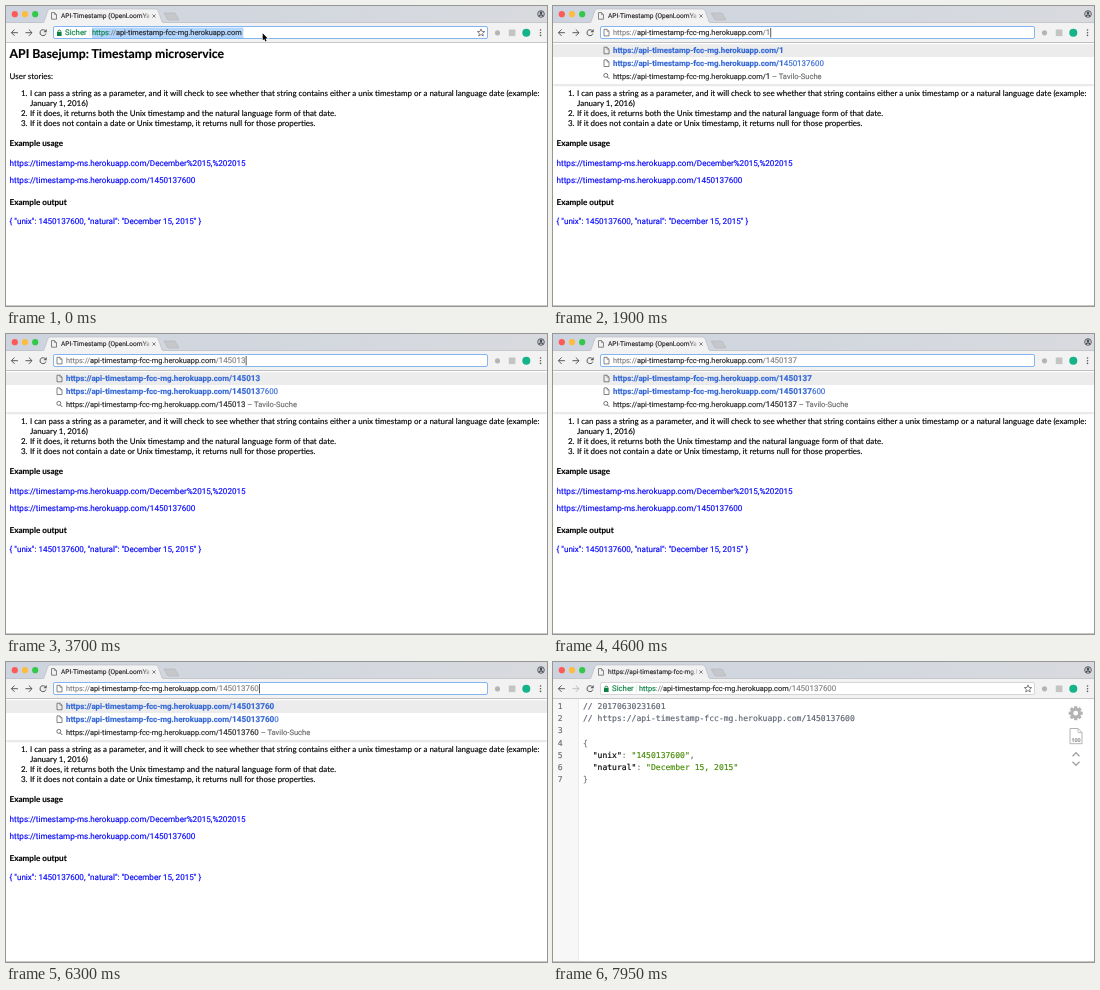
An HTML page with a canvas that plays this animation: 541 by 300 pixels, repeating every 8 s.

```html
<!DOCTYPE html>
<html lang="en">
<head>
<meta charset="utf-8">
<title>Timestamp microservice</title>
<style>
html, body { margin: 0; width: 100%; height: 100%; overflow: hidden; background: #fff; }
canvas { display: block; width: 541px; height: 300px; }
</style>
</head>
<body>
<canvas id="stage"></canvas>
<script>
const W = 541, H = 300, LOOP = 8000;
const canvas = document.getElementById('stage');
const ctx = canvas.getContext('2d');
const ratio = window.devicePixelRatio || 1;
canvas.width = W * ratio;
canvas.height = H * ratio;
ctx.textRendering = 'geometricPrecision';

const HOST = 'api-timestamp-fcc-mg.herokuapp.com';
const DIGITS = '1450137600';
const DESELECT = 500, FIRST_KEY = 900, ENTER = 6850, LOADED = 7450;
const KEYS = [1800, 2050, 2400, 3000, 3300, 3600, 3950, 6050, 6250, 6500];

const ui = size => `${size}px Roboto, sans-serif`;
const lato = size => `${size}px Lato, sans-serif`;
const UI = ui(7.4), UI_NUM = ui(7.95);
const UI_BOLD = 'bold ' + ui(7.88), UI_BOLD_NUM = 'bold ' + ui(8.2);
const BODY = lato(7.97), BODY_BOLD = 'bold ' + lato(8.1);
const LINK = ui(8.1), MONO = '8.07px "DejaVu Sans Mono", monospace';
const GREY = '#808080', DARK = '#5a5a5a', INK = '#222', BLUE = '#3367d6', GREEN = '#0b8043';

// A hairline stroke gives the slightly heavy look of smoothed screen text.
function text(str, x, y, font, color) {
  ctx.font = font;
  ctx.fillStyle = ctx.strokeStyle = color;
  ctx.lineWidth = 0.15;
  ctx.fillText(str, x, y);
  ctx.strokeText(str, x, y);
  return x + ctx.measureText(str).width;
}

// Draws [text, font, color] pieces one after another, returns the end x.
function run(x, y, pieces) {
  for (const [str, font, color] of pieces) x = text(str, x, y, font, color);
  return x;
}

function box(x, y, w, h, color) {
  ctx.fillStyle = color;
  ctx.fillRect(x, y, w, h);
}

function trace(points, close) {
  ctx.beginPath();
  points.forEach(([x, y], i) => i ? ctx.lineTo(x, y) : ctx.moveTo(x, y));
  if (close) ctx.closePath();
}

function line(points, color, width = 1, close = false) {
  trace(points, close);
  ctx.strokeStyle = color;
  ctx.lineWidth = width;
  ctx.stroke();
}

function shape(points, color) {
  trace(points, true);
  ctx.fillStyle = color;
  ctx.fill();
}

function disc(x, y, r, color) {
  ctx.beginPath();
  ctx.arc(x, y, r, 0, 7);
  ctx.fillStyle = color;
  ctx.fill();
}

function arc(x, y, r, from, to, color, width = 1) {
  ctx.beginPath();
  ctx.arc(x, y, r, from, to);
  ctx.strokeStyle = color;
  ctx.lineWidth = width;
  ctx.stroke();
}

function pageIcon(x, y, color = '#666') {
  line([[x, y], [x + 3, y], [x + 5, y + 2], [x + 5, y + 6.6], [x, y + 6.6]], color, 0.8, true);
  line([[x + 3, y], [x + 3, y + 2], [x + 5, y + 2]], color, 0.6);
}

function cross(x, y, r, color, width) {
  line([[x - r, y - r], [x + r, y + r]], color, width);
  line([[x + r, y - r], [x - r, y + r]], color, width);
}

function arrow(x, y, dir, color) {
  line([[x - 3.3 * dir, y], [x + 3.2 * dir, y]], color, 1);
  line([[x, y - 3.2], [x + 3.2 * dir, y], [x, y + 3.2]], color, 1);
}

function star(x, y) {
  const points = [];
  for (let i = 0; i < 10; i++) {
    const a = i * Math.PI / 5 - Math.PI / 2, r = i % 2 ? 1.7 : 3.9;
    points.push([x + r * Math.cos(a), y + r * Math.sin(a)]);
  }
  line(points, '#666', 0.8, true);
}

function tabStrip(s) {
  const g = ctx.createLinearGradient(0, 0, W, 0);
  g.addColorStop(0, '#cdd4df');
  g.addColorStop(1, '#d8dade');
  box(0, 0, W, 17, g);
  ['#fc5b57', '#fdbc40', '#34c84a'].forEach((c, i) => disc(8.8 + 10.2 * i, 8.2, 3.1, c));
  box(0, 16.5, W, 0.5, '#b4b4b4');
  const tab = [[36, 17], [38, 16], [42, 4.4], [44, 3], [150, 3], [152, 4.4], [156, 16], [158, 17]];
  shape(tab, '#f2f2f2');
  line(tab, '#b0b0b0', 0.5);
  const plus = [[158, 7], [169, 7], [173, 14], [162, 14]];
  shape(plus, '#c5c7ca');
  line(plus, '#aeaeae', 0.5, true);

  if (s.loading) {
    const a = -Math.PI / 2 - (s.t - ENTER - 100) / 1000 * Math.PI * 2;
    arc(48, 10, 3.2, a, a + 1.7, '#888', 0.9);
  } else pageIcon(45.5, 6.6);

  ctx.save();
  ctx.beginPath();
  ctx.rect(54, 3, 90, 14);
  ctx.clip();
  const fade = ctx.createLinearGradient(135, 0, 144, 0);
  fade.addColorStop(0, '#222');
  fade.addColorStop(1, 'rgba(34,34,34,0.15)');
  text(s.loaded ? 'https://' + HOST : 'API-Timestamp (OpenLoomYard)', 55, 12.3, ui(6.6), fade);
  ctx.restore();
  cross(148, 10, 1.6, '#666', 0.8);

  arc(535, 8, 3.3, 0, 7, '#4a4f57', 0.9);
  disc(535, 7, 1.4, '#4a4f57');
  arc(535, 10.6, 1.8, Math.PI, 0, '#4a4f57', 1.2);
}

function toolbar(s) {
  box(0, 17, W, 19.5, '#f2f2f2');
  box(0, 36, W, 0.8, '#bcbcbc');
  arrow(8.6, 26.7, -1, DARK);
  arrow(22.8, 26.7, 1, s.loaded ? '#bdbdbd' : DARK);
  if (s.loading) cross(37, 26.7, 2.7, DARK, 1.1);
  else {
    arc(37, 26.7, 3, 0.3, 5.4, DARK, 1);
    shape([[40.7, 22.9], [40.7, 26.3], [37.3, 26.3]], DARK);
  }

  ctx.beginPath();
  ctx.roundRect(47.5, 20.5, 434, 12, 1.5);
  ctx.fillStyle = '#fff';
  ctx.fill();
  ctx.strokeStyle = s.focus ? '#83b5ef' : '#c8c8c8';
  ctx.lineWidth = s.focus ? 1 : 0.7;
  ctx.stroke();
  if (!s.editing) star(475, 26.8);

  disc(491.5, 26.8, 2.6, '#b5b5b5');
  box(502.8, 23.5, 6.6, 6.6, '#c4c4c4');
  disc(520.3, 26.7, 4, '#15b38a');
  for (let i = -1; i < 2; i++) disc(534.5, 26.7 + 2.7 * i, 0.8, DARK);
  address(s);
}

function address(s) {
  const y = 29.3;
  const path = s.url ? [['/', UI, GREY], [s.typed, UI_NUM, GREY]] : [];
  const secure = !s.editing && !s.loading;
  let x = 60;
  if (secure) {
    box(51, 25.8, 4.6, 4.2, GREEN);
    arc(53.3, 25.6, 1.5, Math.PI, 0, GREEN, 0.9);
    text('Sicher', 59, y, ui(7.8), GREEN);
    box(83.6, 22.5, 0.5, 8.5, '#d5d5d5');
    x = 86;
  } else if (s.loading) {
    arc(53.3, 26.7, 3.1, 0, 7, '#666', 0.8);
    box(52.9, 26, 0.8, 2.5, '#666');
    box(52.9, 24.5, 0.8, 0.8, '#666');
  } else pageIcon(51, 23.3);

  if (s.selected) box(86, 21.6, 151.4, 10.4, '#b2d5fd');
  const scheme = secure
    ? [['https', UI, GREEN], ['://', UI, GREY]]
    : [['https://', UI, GREY]];
  x = run(x, y, [...scheme, [HOST, UI, INK], ...path]);
  if (s.caret) box(x + 0.3, 22, 0.7, 9.4, '#111');
}

function dropdown(s) {
  const full = s.typed.length === DIGITS.length;
  const bottom = full ? 65.8 : 78.5;
  const hint = '#6a6a6a';
  ctx.save();
  ctx.shadowColor = 'rgba(0,0,0,0.25)';
  ctx.shadowBlur = 2 * ratio;
  ctx.shadowOffsetY = 0.7 * ratio;
  box(0, 36.8, W, bottom - 36.8, '#fff');
  ctx.restore();
  box(0, 36, W, 0.8, '#bcbcbc');
  box(0, 38.3, W, 12.7, '#ececec');

  let y = 47.3;
  pageIcon(51, y - 6.1);
  const match = [['https://' + HOST, UI_BOLD, BLUE]];
  const tail = [['/', UI_BOLD, BLUE], [s.typed, UI_BOLD_NUM, BLUE]];
  run(60, y, s.typed
    ? [...match, ...tail]
    : [...match, [' – API-Timestamp (OpenLoomYard)', ui(7.6), hint]]);
  y += 12.7;
  if (!full) {
    pageIcon(51, y - 6.1);
    run(60, y, [...match, ...tail, [DIGITS.slice(s.typed.length), UI_NUM, BLUE]]);
    y += 12.7;
  }
  arc(52.8, y - 3.3, 2, 0, 7, '#666', 0.9);
  line([[54.2, y - 1.9], [56.4, y + 0.3]], '#666', 1);
  run(60, y, [
    ['https://' + HOST + '/', UI, INK], [s.typed, UI_NUM, INK],
    [' – Tavilo-Suche', ui(7.6), hint]
  ]);
}

function storyPage() {
  const black = '#000', link = '#0000ff';
  text('API Basejump: Timestamp microservice', 3.6, 52, 'bold ' + lato(12.26), black);
  text('User stories:', 3.6, 72.7, BODY, black);
  const stories = [
    [90.4, '1.', 'I can pass a string as a parameter, and it will check to see whether that string contains either a unix timestamp or a natural language date (example:'],
    [100.1, '', 'January 1, 2016)'],
    [109.8, '2.', 'If it does, it returns both the Unix timestamp and the natural language form of that date.'],
    [119.5, '3.', 'If it does not contain a date or Unix timestamp, it returns null for those properties.']
  ];
  for (const [y, mark, story] of stories) {
    text(mark, 15, y, BODY, black);
    text(story, 24, y, BODY, black);
  }
  text('Example usage', 3.6, 139.6, BODY_BOLD, black);
  text('https://timestamp-ms.herokuapp.com/December%2015,%202015', 3.6, 159.5, LINK, link);
  text('https://timestamp-ms.herokuapp.com/1450137600', 3.6, 177.3, LINK, link);
  text('Example output', 3.6, 198.5, BODY_BOLD, black);
  text('{ "unix": 1450137600, "natural": "December 15, 2015" }', 3.6, 218.3, LINK, link);
}

function jsonPage() {
  box(0, 36.8, 25, H - 36.8, '#f7f7f7');
  box(25, 36.8, 0.6, H - 36.8, '#dddddd');
  const note = '#5c6370', mark = '#777', key = '#000', value = '#458b00';
  const rows = [
    [['// 20170630231601', note]],
    [['// https://' + HOST + '/' + DIGITS, note]],
    [],
    [['{', mark]],
    [['  "unix"', key], [': ', mark], ['"1450137600"', value], [',', mark]],
    [['  "natural"', key], [': ', mark], ['"December 15, 2015"', value]],
    [['}', mark]]
  ];
  rows.forEach((row, i) => {
    const y = 47 + 12.2 * i;
    text(String(i + 1), 4.8, y, MONO, '#6d6d6d');
    run(30, y, row.map(([str, color]) => [str, MONO, color]));
  });

  const tint = '#b3b3b3';
  for (let i = 0; i < 8; i++) {
    ctx.save();
    ctx.translate(522.7, 51.2);
    ctx.rotate(i * Math.PI / 4);
    box(-1.6, -7, 3.2, 3, tint);
    ctx.restore();
  }
  arc(522.7, 51.2, 3.9, 0, 7, tint, 3);
  line([[517, 66.5], [525, 66.5], [529, 70.5], [529, 81.7], [517, 81.7]], tint, 1, true);
  line([[525, 66.5], [525, 70.5], [529, 70.5]], tint, 0.8);
  text('100', 518.4, 79.7, 'bold ' + ui(5.4), '#999');
  line([[519.5, 94.3], [523, 90.8], [526.5, 94.3]], '#a5a5a5', 1.5);
  line([[519.5, 99.7], [523, 103.2], [526.5, 99.7]], '#a5a5a5', 1.5);
}

function pointer(x, y) {
  const tip = [[0, 0], [0, 7], [1.6, 5.6], [2.7, 8.2], [3.9, 7.7], [2.8, 5.2], [5, 5.2]]
    .map(([dx, dy]) => [x + dx, y + dy]);
  line(tip, '#fff', 1.2, true);
  shape(tip, '#000');
}

function stateAt(t) {
  const presses = KEYS.filter(k => k <= t);
  const editing = t >= FIRST_KEY && t < ENTER;
  const selected = t < DESELECT;
  const focus = t < ENTER;
  const lastKey = presses.length ? presses[presses.length - 1] : editing ? FIRST_KEY : DESELECT;
  return {
    t, editing, selected, focus,
    url: t >= FIRST_KEY,
    typed: DIGITS.slice(0, presses.length),
    caret: focus && !selected && (t - lastKey) % 1000 < 500,
    loading: t >= ENTER && t < LOADED,
    loaded: t >= LOADED
  };
}

function draw(now) {
  const s = stateAt(now % LOOP);
  ctx.setTransform(ratio, 0, 0, ratio, 0, 0);
  box(0, 0, W, H, '#fff');
  if (s.loaded) jsonPage(); else storyPage();
  box(0, 299, W, 1, '#c8c8c8');
  tabStrip(s);
  toolbar(s);
  if (s.editing) dropdown(s);
  if (s.t < FIRST_KEY) pointer(256.7, 27.3);
}

const start = performance.now();
function tick() {
  draw(performance.now() - start);
  requestAnimationFrame(tick);
}
tick();
</script>
</body>
</html>
```
